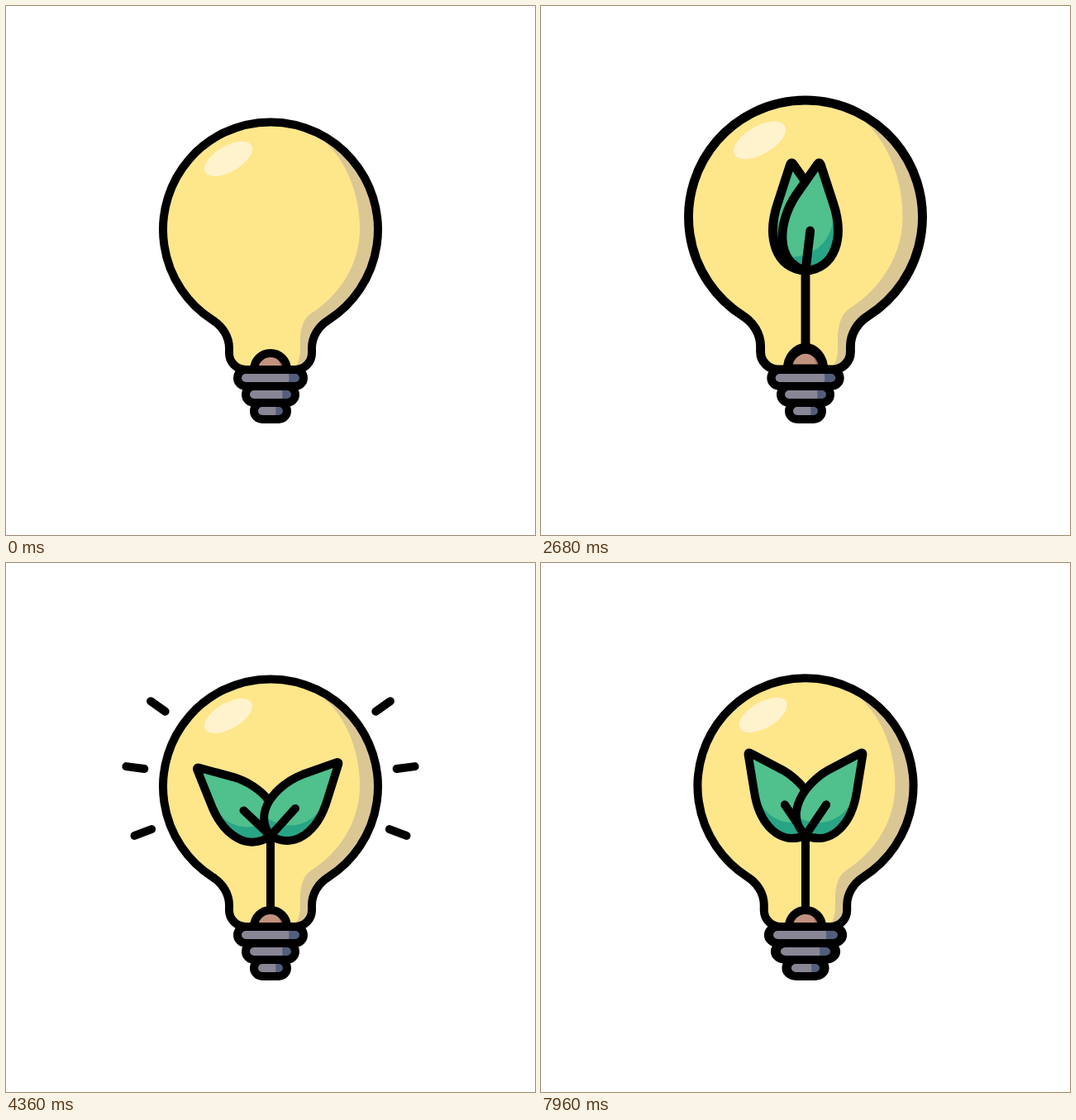
An HTML page for the animation above (8 s loop, 640 by 640 pixels).

```html
<!DOCTYPE html>
<html lang="en">
<head>
<meta charset="utf-8">
<title>Growing idea</title>
<style>
  html, body { margin: 0; width: 100%; height: 100%; overflow: hidden; background: #fff; }
  svg { display: block; width: 100vw; height: 100vh; }
  .line { fill: none; stroke: #000; stroke-width: 10; stroke-linecap: round; stroke-linejoin: round; }
</style>
</head>
<body>
<svg viewBox="0 0 640 640">
  <defs>
    <path id="glass" d="M290 440A20 20 0 0 1 270 420V414C270 400 262 387.5 250 380A130 130 0 1 1 390 380C378 387.5 370 400 370 414V420A20 20 0 0 1 350 440Z"/>
    <path id="mound" d="M-20 0A20 20 0 0 1 20 0Z"/>
    <path id="blade" d="M0 0C30 13 56 -12 62 -54L69 -97Q69.5 -101 66 -99L28 -79C-2 -62 -26 -25 0 0Z"/>
    <clipPath id="inGlass"><use href="#glass"/></clipPath>
    <clipPath id="inMound"><use href="#mound"/></clipPath>
    <clipPath id="inBlade"><use href="#blade"/></clipPath>
    <g id="leaf">
      <use href="#blade" fill="#50c08d"/>
      <path clip-path="url(#inBlade)" fill="#28a585" d="M64 -62C54 -20 22 -4 -14 -24L-20 20H80V-62Z"/>
      <use href="#blade" class="line"/>
      <path class="line" d="M25 -37L0 0"/>
    </g>
  </defs>

  <g id="rays"></g>

  <g id="bulb">
    <use href="#glass" fill="#fee68b"/>
    <path clip-path="url(#inGlass)" fill="#dac794" d="M360 146C402 167 428 215 428 270C428 312 404 350 369 372C358 379 355 395 356 414C356 425 354 433 348 440H400L470 380V130H360Z"/>
    <ellipse rx="32.3" ry="15.5" fill="#fff3cd" transform="translate(269 185) rotate(-30)"/>
    <use href="#glass" class="line"/>
    <g id="plant">
      <path id="stem" class="line"/>
      <use id="left" href="#leaf"/>
      <use id="right" href="#leaf"/>
    </g>
    <g id="soil">
      <use href="#mound" fill="#c2927f"/>
      <path clip-path="url(#inMound)" fill="#a56f64" d="M2 -20Q12 -11 13 0H25V-20Z"/>
      <use href="#mound" class="line"/>
    </g>
  </g>

  <g id="base"></g>
</svg>
<script>
const LOOP = 8000;
const CYCLE = 6500;
const $ = id => document.getElementById(id);
const set = (el, attrs) => { for (const k in attrs) el.setAttribute(k, attrs[k]); return el; };
const add = (parent, tag, attrs) =>
  parent.appendChild(set(document.createElementNS('http://www.w3.org/2000/svg', tag), attrs));
const lerp = (a, b, p) => a + (b - a) * p;

// Smooth 0 to 1 between two times
const ease = (t, from, to) => {
  const u = Math.min(1, Math.max(0, (t - from) / (to - from)));
  return (1 - Math.cos(Math.PI * u)) / 2;
};
// Smooth rise and fall
const pulse = (t, from, peak, to) => ease(t, from, peak) - ease(t, peak, to);

// Screw rings: half width, top, shade start, swell, swell start
const rings = [
  { w: 20, y: 480, cut: 6, grow: 0.28, from: -30 },
  { w: 30, y: 460, cut: 14, grow: 0.206, from: 540 },
  { w: 40, y: 440, cut: 22, grow: 0.22, from: 950 }
].map(r => {
  const g = add($('base'), 'g', {});
  const pill = { x: -r.w, y: r.y, width: 2 * r.w, height: 20, rx: 10 };
  add(g, 'rect', { ...pill, fill: '#888695' });
  const a = r.w - 10;
  add(g, 'path', {
    fill: '#525e7b',
    d: `M${r.cut - 1} ${r.y}Q${r.cut + 2} ${r.y + 10} ${r.cut - 1} ${r.y + 20}H${a}a10 10 0 0 0 0 -20Z`
  });
  add(g, 'rect', { ...pill, class: 'line' });
  return { ...r, g };
});

// Rays: inner and outer end, mirrored
const rays = [
  [196, 182, 163.5, 159],
  [171.5, 249.6, 131, 244.2],
  [180, 320.6, 142, 335]
].flatMap(ends => [false, true].map(flip => ({
  ends,
  el: add($('rays'), 'path', { class: 'line', transform: flip ? 'translate(640 0) scale(-1 1)' : '' })
})));

function drawRays(t) {
  $('rays').style.display = t >= 3340 && t < 5890 ? '' : 'none';
  const head = ease(t, 3340, 5060), tail = ease(t, 3960, 5890);
  for (const { ends: [x1, y1, x2, y2], el } of rays) {
    const at = p => `${lerp(x1, x2, p)} ${lerp(y1, y2, p)}`;
    set(el, { d: `M${at(tail)}L${at(head)}` });
  }
}

function drawPlant(t) {
  const grown = ease(t, 1450, 2610);
  $('plant').style.display = grown > 0 ? '' : 'none';
  const y = 440 - 110 * grown;
  const size = Math.pow(grown, 1.35);
  const swing = over =>
    lerp(-28, over, ease(t, 2560, 3950)) - over * ease(t, 4150, 4900);
  set($('stem'), { d: `M320 440V${y}` });
  set($('right'), { transform: `translate(320 ${y}) rotate(${swing(10)}) scale(${size})` });
  set($('left'), { transform: `translate(320 ${y}) scale(-1 1) rotate(${swing(15.5)}) scale(${size})` });
}

function draw(t) {
  const beat = t > 6300 ? t - CYCLE : t;
  for (const { g, grow, from } of rings) {
    const sx = 1 + grow * pulse(beat, from, from + 1000, from + 2000);
    set(g, { transform: `translate(320 0) scale(${sx} 1)` });
  }
  const zoom = 1 + 0.1 * pulse(beat, 1320, 2390, 3700);
  set($('bulb'), { transform: `translate(320 440) scale(${zoom}) translate(-320 -440)` });
  const heap = 1 + 0.25 * pulse(t, 1100, 2150, 3650);
  set($('soil'), { transform: `translate(320 440) scale(1 ${heap})` });
  drawPlant(t);
  drawRays(t);
}

const start = performance.now();
function tick() {
  draw((performance.now() - start) % LOOP);
  requestAnimationFrame(tick);
}
tick();
</script>
</body>
</html>
```
